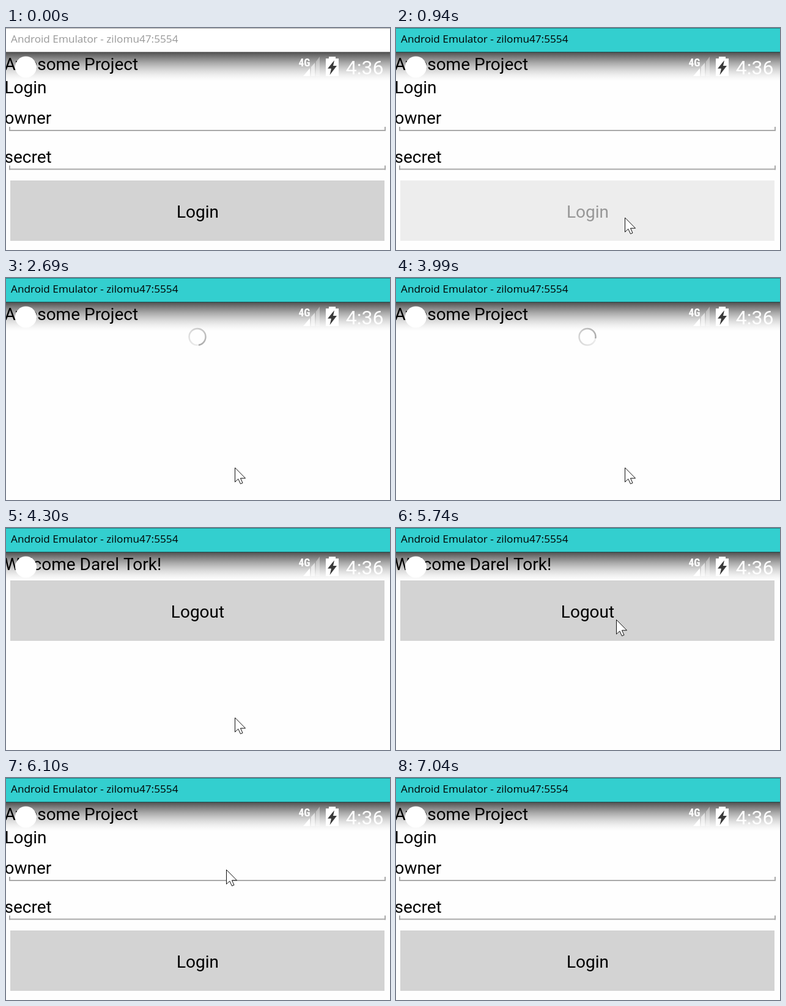
An HTML page with a canvas that plays this animation: 628 by 364 pixels, repeating every 8000 ms.

```html
<!DOCTYPE html>
<html lang="en">
<head>
<meta charset="utf-8">
<title>Login demo</title>
<style>
  html, body { margin: 0; width: 100%; height: 100%; overflow: hidden; background: #fff; }
  canvas { display: block; width: 628px; height: 364px; }
</style>
</head>
<body>
<canvas id="stage" width="628" height="364"></canvas>
<script>
const ctx = document.getElementById('stage').getContext('2d');
const LOOP = 8000;
const TEXT_X = -2.5;

const clamp = v => Math.max(0, Math.min(1, v));
const smooth = p => p * p * (3 - 2 * p);
const mix = (a, b, p) => a + (b - a) * p;

// Progress that advances in equal held steps; the first step lands at `start`.
function stepped(t, start, end, steps) {
  const gap = (end - start) / (steps - 1);
  return clamp((Math.floor((t - start) / gap + 0.001) + 1) / steps);
}

function text(str, x, y, size = 28, color = '#000', align = 'left', family = 'Roboto', weight = 400) {
  ctx.font = `${weight} ${size}px ${family}, sans-serif`;
  ctx.textAlign = align;
  ctx.fillStyle = color;
  ctx.fillText(str, x, y);
}

function rect(color, x, y, w, h) {
  ctx.fillStyle = color;
  ctx.fillRect(x, y, w, h);
}

function polygon(points, color, stroke) {
  ctx.beginPath();
  points.forEach(([x, y]) => ctx.lineTo(x, y));
  ctx.closePath();
  ctx.fillStyle = color;
  ctx.fill();
  if (stroke) {
    ctx.strokeStyle = stroke;
    ctx.lineWidth = 1;
    ctx.stroke();
  }
}

function button(label, y, opacity) {
  const shade = c => Math.round(255 - (255 - c) * opacity);
  const gray = c => `rgb(${shade(c)},${shade(c)},${shade(c)})`;
  rect(gray(211), 7, y, 612, 99);
  text(label, 313.5, y + 60.5, 28, gray(0), 'center');
}

function input(value, baseline) {
  text(value, TEXT_X, baseline);
  const bottom = baseline + 12;
  rect('#a9a9a9', 5, bottom - 2, 616, 2);
  rect('#a9a9a9', 5, bottom - 7, 2, 7);
  rect('#a9a9a9', 619, bottom - 7, 2, 7);
}

function loginForm(opacity) {
  text('Login', TEXT_X, 106.5);
  input('owner', 157);
  input('secret', 220.5);
  button('Login', 250, opacity);
}

function spinner(t) {
  const cx = 313, cy = 96.5;
  const head = ((t - 2070) / 1630 * 360 - 55) * Math.PI / 180;
  const shade = ctx.createConicGradient(head, cx, cy);
  shade.addColorStop(0, '#eeeeee');
  shade.addColorStop(0.5, '#d2d2d2');
  shade.addColorStop(1, '#a8a8a8');
  ctx.strokeStyle = shade;
  ctx.lineWidth = 2.5;
  ctx.beginPath();
  ctx.arc(cx, cy, 13.5, 0, Math.PI * 2);
  ctx.stroke();
}

function statusBar() {
  const top = 39, height = 49;
  const shade = ctx.createLinearGradient(0, top, 0, top + height);
  for (let u = 0; u <= 1; u += 0.125) {
    shade.addColorStop(u, `rgba(0,0,0,${0.7 * Math.pow(1 - u, 1.6)})`);
  }
  rect(shade, 0, top, 628, height);

  ctx.fillStyle = '#fff';
  ctx.beginPath();
  ctx.arc(32.5, 64, 17.5, 0, Math.PI * 2);
  ctx.fill();

  polygon([[486, 79], [497, 66], [497, 79]], '#fff');
  polygon([[499, 64], [505, 57], [505, 79], [499, 79]], 'rgba(255,255,255,0.6)');
  polygon([[507, 55], [513, 47], [513, 79], [507, 79]], 'rgba(255,255,255,0.35)');
  text('4G', 478.5, 63, 17.5, '#fff', 'left', '"Roboto Condensed", Roboto', 700);

  rect('#fff', 528, 47, 11, 4);
  rect('#fff', 523, 50, 21, 29);
  polygon([[537, 53], [526, 66.5], [532, 66.5], [529.5, 77], [541, 62], [535, 62]], '#383838');
  text('4:36', 617.5, 76, 32, '#fff', 'right');
}

function titleBar(active) {
  rect(active ? '#33cfcf' : '#fff', 0, 0, 628, 39);
  rect(active ? '#1f8585' : '#aaa', 0, 0, 628, 1);
  rect(active ? '#1d5252' : '#777', 0, 39, 628, 1);
  text('Android Emulator - zilomu47:5554', 8, 24, 17.2, active ? '#000' : '#999', 'left', '"Open Sans"');
}

function cursorAt(t) {
  const path = (a, b, p) => [mix(a[0], b[0], p), mix(a[1], b[1], p)];
  const entry = [452, 352], login = [374.5, 311], logout = [360.5, 150.5], exit = [472, 331];
  if (t < 630 || t >= 7040) return null;
  if (t < 5160) return path(entry, login, smooth(stepped(t, 630, 782, 3)));
  if (t < 6800) return path(login, logout, smooth(stepped(t, 5160, 5740, 8)));
  return path(logout, exit, Math.pow(stepped(t, 6800, 6960, 3), 1.3));
}

function cursor(t) {
  const pos = cursorAt(t);
  if (!pos) return;
  const arrow = [[0, 0], [0, 23.5], [5.3, 18.5], [9, 26.5], [12.5, 25], [9, 17.3], [17, 17.3]];
  polygon(arrow.map(([x, y]) => [x + pos[0], y + pos[1]]), '#fff', '#111');
}

function draw(t) {
  rect('#fefefe', 0, 0, 628, 364);
  const loggedIn = t >= 4300 && t < 6100;
  text(loggedIn ? 'Welcome Darel Tork!' : 'Awesome Project', TEXT_X, 69);

  if (loggedIn) {
    button('Logout', 86, t < 5970 ? 1 : 0.2);
  } else if (t >= 1180 && t < 4300) {
    spinner(t);
  } else {
    const pressed = t >= 858 && t < 1180 ? stepped(t, 858, 1010, 3) : 0;
    loginForm(mix(1, 0.2, smooth(pressed)));
  }
  statusBar();
  titleBar(t >= 858);
  cursor(t);
}

function tick() {
  draw(performance.now() % LOOP);
  requestAnimationFrame(tick);
}
tick();
</script>
</body>
</html>
```
